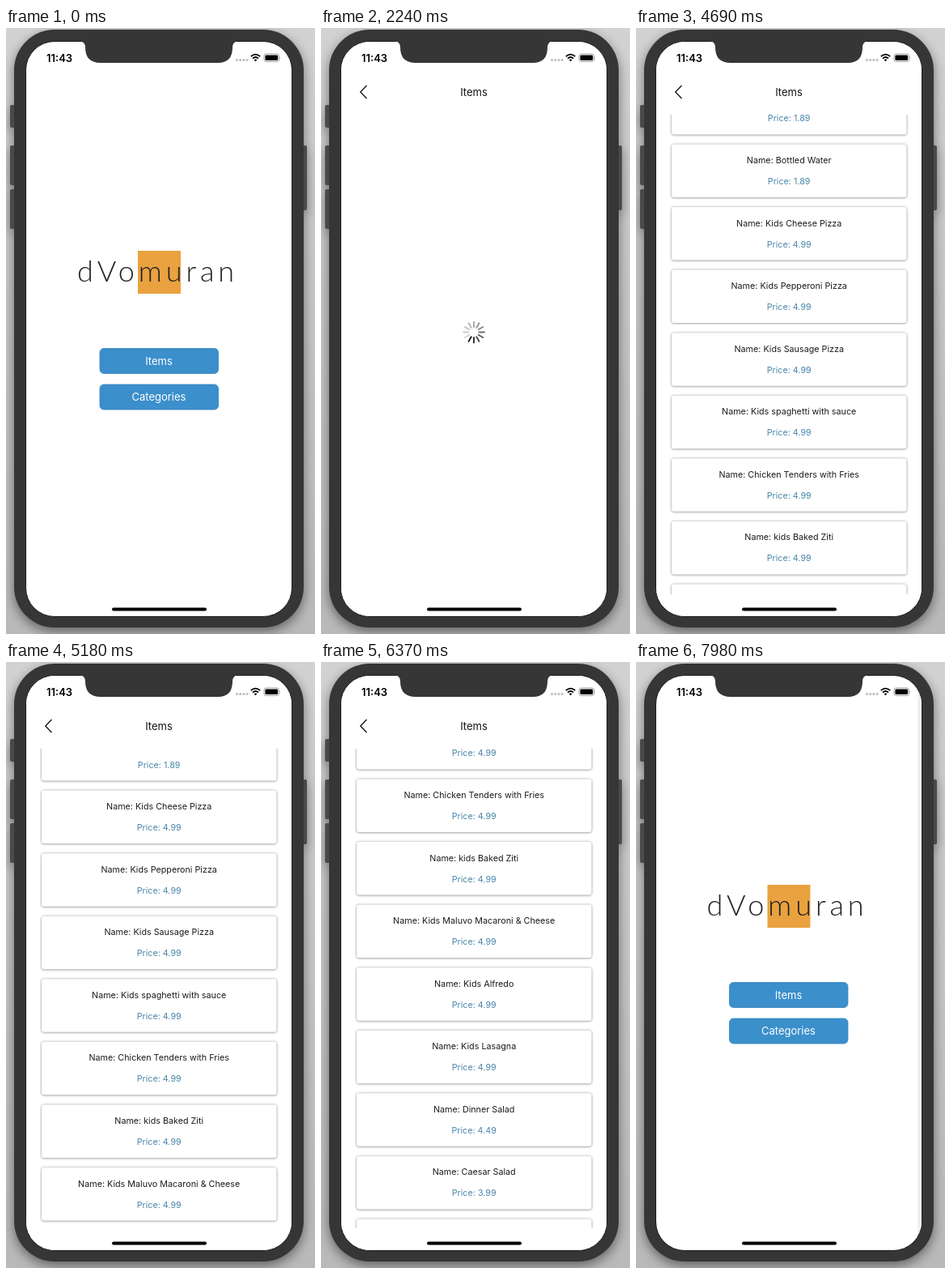
Write an HTML page that moves like this. It is 382 by 748 pixels and loops after 8000 ms.

```html
<!DOCTYPE html>
<html lang="en">
<head>
<meta charset="utf-8">
<title>Item list demo</title>
<style>
  html, body { margin: 0; width: 100%; height: 100%; overflow: hidden; background: #c4c4c4; }
  svg { display: block; font-family: Inter, Roboto, sans-serif; }
  #phone { filter: drop-shadow(0 5px 7px #0007); }
  .mid { text-anchor: middle; }
  .title { font-size: 13px; fill: #151515; }
  .button rect { fill: #3b8fcb; stroke: #3384bf; stroke-width: .8; }
  .button text { font-size: 13px; fill: #fff; }
  .card rect { fill: #fff; filter: drop-shadow(0 0 1.5px #0005) drop-shadow(0 1px .8px #0003); }
  .card text { font-size: 10.75px; fill: #1c1c1c; }
  .card .price { fill: #4a87aa; }
  #itemsPage > rect { filter: drop-shadow(-1px 0 2px #0002); }
</style>
</head>
<body>
<svg width="382" height="748" viewBox="0 0 382 748">
  <defs>
    <linearGradient id="desk" x2="0" y2="1">
      <stop stop-color="#d2d2d2"/><stop offset="1" stop-color="#b9b9b9"/>
    </linearGradient>
    <clipPath id="screenClip"><rect x="25" y="17" width="328" height="709" rx="35"/></clipPath>
    <clipPath id="listClip"><rect x="25" y="107" width="328" height="592"/></clipPath>
  </defs>
  <rect width="382" height="748" fill="url(#desk)"/>

  <g id="phone">
    <g fill="#4a4a4a">
      <rect x="5" y="95" width="8" height="28" rx="2"/>
      <rect x="5" y="145" width="8" height="49" rx="2"/>
      <rect x="5" y="199" width="8" height="49" rx="2"/>
      <rect x="364" y="145" width="8" height="80" rx="2"/>
    </g>
    <rect x="10" y="2" width="358" height="738" rx="50" fill="#363636"/>
  </g>
  <rect x="24.5" y="16.5" width="329" height="710" rx="35.5" fill="#fff" stroke="#1c1c1c"/>

  <g clip-path="url(#screenClip)">
    <g id="homePage">
      <rect x="163" y="275" width="53" height="53" fill="#e9a23f"/>
      <text x="88" y="313" font-family="Lato, sans-serif" font-weight="300" font-size="36"
            letter-spacing="5" fill="#222">dVomuran</text>
      <g class="button mid" id="itemsButton">
        <rect x="116" y="395.5" width="146.5" height="31" rx="5"/>
        <text x="189" y="416">Items</text>
      </g>
      <g class="button mid">
        <rect x="116" y="440" width="146.5" height="31" rx="5"/>
        <text x="189" y="460">Categories</text>
      </g>
    </g>

    <g id="itemsPage">
      <rect x="25" y="17" width="400" height="709" fill="#fff"/>
      <path id="back" d="M56.5 71 L48.8 79 L56.5 87" fill="none" stroke="#111" stroke-width="1.3"/>
      <text class="mid title" x="189" y="84">Items</text>
      <g id="spinner" stroke="#111" stroke-width="1.9" stroke-linecap="round"></g>
      <g id="listFrame" clip-path="url(#listClip)"><g id="list"></g></g>
    </g>
  </g>

  <path fill="#363636" d="M91 16 Q98 17 98 24 Q98 43 117 43 H262 Q280 43 280 24 Q280 17 287 16Z"/>
  <text x="50" y="41.5" font-size="13" font-weight="600">11:43</text>
  <g fill="#bdbdbd">
    <circle cx="285.5" cy="39.5" r="1.5"/><circle cx="289.7" cy="39.5" r="1.5"/>
    <circle cx="293.9" cy="39.5" r="1.5"/><circle cx="298.1" cy="39.5" r="1.5"/>
  </g>
  <g fill="none" stroke="#000" stroke-width="1.8">
    <path d="M302.8 35.2 Q308.5 30 314.2 35.2"/>
    <path d="M305 37.6 Q308.5 34.4 312 37.6"/>
  </g>
  <path d="M306.6 39.3 Q308.5 37.6 310.4 39.3 L308.5 41.3Z"/>
  <rect x="319" y="32" width="18.5" height="9.5" rx="2.5" fill="none" stroke="#999" stroke-width=".9"/>
  <rect x="320.4" y="33.4" width="15.7" height="6.7" rx="1.4"/>
  <path d="M338.6 35 Q340 36.7 338.6 38.5Z" fill="#999"/>
  <rect x="131" y="715.5" width="117" height="4" rx="2"/>
</svg>

<script>
const LOOP = 8000, FRAME = 70, PAGE_WIDTH = 328;
const CARD_TOP = 113, CARD_PITCH = 77.57;
const SPOKES = 12, SPOKE_TIME = 91.5;

const items = [
  ["2 Liter Soda", "2.99"], ["Can Soft Drink", "0.99"], ["Fountain", "1.89"],
  ["Iced Tea", "1.89"], ["Bottled Water", "1.89"], ["Kids Cheese Pizza", "4.99"],
  ["Kids Pepperoni Pizza", "4.99"], ["Kids Sausage Pizza", "4.99"],
  ["Kids spaghetti with sauce", "4.99"], ["Chicken Tenders with Fries", "4.99"],
  ["kids Baked Ziti", "4.99"], ["Kids Maluvo Macaroni &amp; Cheese", "4.99"],
  ["Kids Alfredo", "4.99"], ["Kids Lasagna", "4.99"], ["Dinner Salad", "4.49"],
  ["Caesar Salad", "3.99"], ["Greek Salad", "4.49"]
];

const byId = id => document.getElementById(id);
const [homePage, itemsPage, itemsButton, back, spinner, listFrame, list] =
  ["homePage", "itemsPage", "itemsButton", "back", "spinner", "listFrame", "list"].map(byId);

list.innerHTML = items.map(([name, price], i) => `
  <g class="card mid" transform="translate(0 ${CARD_TOP + i * CARD_PITCH})">
    <rect x="44" width="290.5" height="65.5" rx="3"/>
    <text x="189.2" y="23.5">Name: ${name}</text>
    <text class="price" x="189.2" y="49.5">Price: ${price}</text>
  </g>`).join("");

spinner.innerHTML = Array.from({ length: SPOKES }, (_, i) =>
  `<path d="M189 369 V362.6" transform="rotate(${i * 360 / SPOKES} 189 375.5)"/>`).join("");

const clamp = x => Math.max(0, Math.min(1, x));
const progress = (t, from, to) => clamp((t - from) / (to - from));
const mix = (a, b, p) => a + (b - a) * p;
const easeOut = p => 1 - (1 - p) ** 2;

// Share of a critically damped spring's travel that is still left.
function springLeft(elapsed) {
  const x = Math.max(0, elapsed) * 0.015;
  return (1 + x) * Math.exp(-x);
}

// 0 = items page fully shown, 1 = home page fully shown.
function pageShift(t) {
  if (t < 870) return springLeft(t - 280);
  return t < 7490 ? 0 : 1 - springLeft(t - 7490);
}

function scrollAt(t) {
  if (t < 4060) return 0;
  if (t < 4200) return mix(7.5, 88, progress(t, 4060, 4200));
  if (t < 4300) return mix(88, 162, progress(t, 4200, 4300));
  if (t <= 5250) return 379.8 - 100 * Math.exp((4690 - Math.min(t, 5180)) / 500);
  if (t < 6300) return mix(342.3, 665.6, easeOut(progress(t, 5250, 5740)));
  return mix(665.6, 668, easeOut(progress(t, 6300, 6580)));
}

function drawSpinner(t) {
  const head = 7 + Math.floor((t - 2185) / SPOKE_TIME);
  [...spinner.children].forEach((spoke, i) => {
    const lag = (((head - i) % SPOKES) + SPOKES) % SPOKES;
    spoke.setAttribute("opacity", 0.18 + 0.8 * (1 - lag / 11) ** 1.4);
  });
}

function draw() {
  const t = Math.floor((performance.now() % LOOP + 0.5) / FRAME) * FRAME;
  const shift = pageShift(t);
  homePage.setAttribute("transform", `translate(${-0.3 * PAGE_WIDTH * (1 - shift)} 0)`);
  itemsPage.setAttribute("transform", `translate(${PAGE_WIDTH * shift} 0)`);
  itemsPage.style.display = shift === 1 ? "none" : "";
  homePage.style.display = shift === 0 ? "none" : "";

  const pressed = progress(t, 0, 210) - progress(t, 210, 420);
  itemsButton.setAttribute("opacity", 1 - 0.8 * pressed);
  back.setAttribute("opacity", t >= 7420 && t < 7560 ? 0.3 : 1);

  const loaded = t >= 3290;
  spinner.style.display = loaded ? "none" : "";
  listFrame.style.display = loaded ? "" : "none";
  if (loaded) list.setAttribute("transform", `translate(0 ${-scrollAt(t)})`);
  else drawSpinner(t);

  requestAnimationFrame(draw);
}
draw();
</script>
</body>
</html>
```
